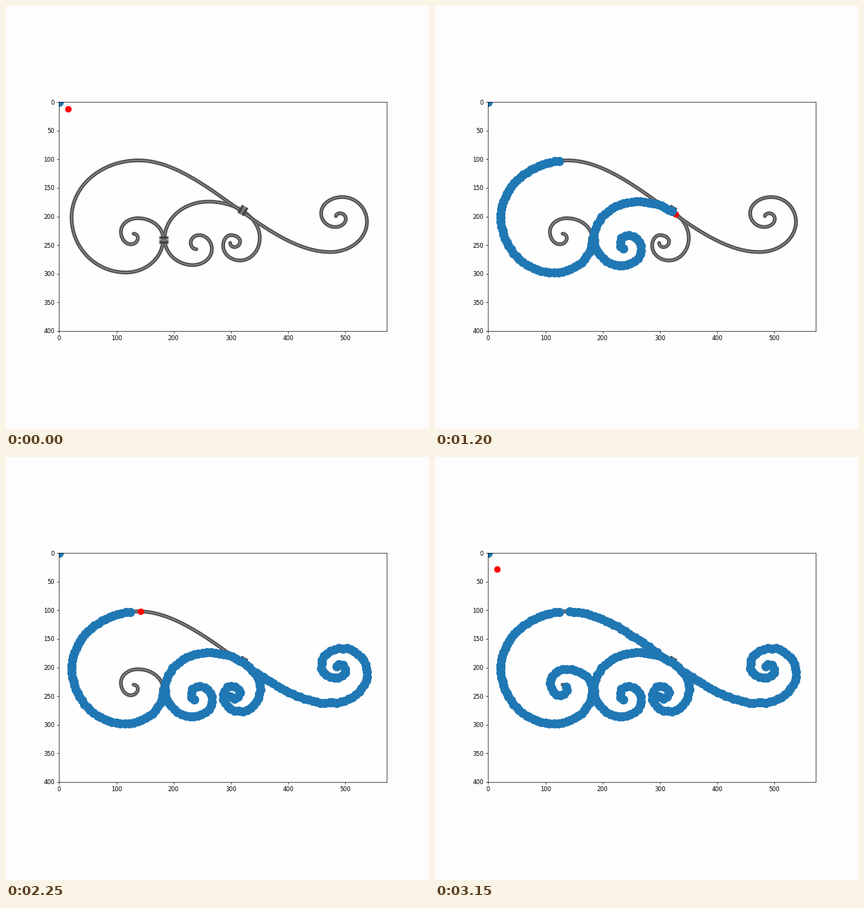
A matplotlib script that plays this animation: 600 px wide and 600 px high, repeating every 3200 ms.

```python
import numpy as np
import matplotlib.pyplot as plt
from matplotlib.animation import FuncAnimation

plt.rcParams["font.family"] = "DejaVu Sans"
FRAMES, INTERVAL = 64, 50
LEFT, RIGHT, TOP, BOTTOM = 75, 540, 135.8, 461.2  # axes box in pixels
SCALE = (RIGHT - LEFT) / 573  # pixels per tick unit
N = 30  # steps per quarter turn
GAP = 6  # distance between traced dots
rng = np.random.default_rng(4)


def scroll(*turns):
    """Quarter ellipses through turning points; the first one is level."""
    t = np.linspace(0, np.pi / 2, N, endpoint=False)
    parts = []
    for i, ((x0, y0), (x1, y1)) in enumerate(zip(turns, turns[1:])):
        if i % 2 == 0:
            parts.append(np.c_[x0 + (x1 - x0) * np.sin(t), y1 + (y0 - y1) * np.cos(t)])
        else:
            parts.append(np.c_[x1 + (x0 - x1) * np.cos(t), y0 + (y1 - y0) * np.sin(t)])
    return np.vstack(parts + [turns[-1]])


def part(curve, a, b=None):
    """Piece of a scroll from quarter a to quarter b."""
    return curve[int(a * N):None if b is None else int(b * N) + 1]


def slope(x0, x1):
    """Piece of the long bar, an S between the crest and the trough."""
    x = np.linspace(x0, x1, 60)
    u = (x - CREST[0]) / (TROUGH[0] - CREST[0])
    return np.c_[x, CREST[1] + (TROUGH[1] - CREST[1]) * u * u * (3 - 2 * u)]


def dots(curve):
    """Evenly spaced, slightly shaky dots along a curve."""
    s = np.r_[0, np.cumsum(np.hypot(*np.diff(curve, axis=0).T))]
    at = np.arange(GAP / 2, s[-1], GAP)
    xy = np.c_[np.interp(at, s, curve[:, 0]), np.interp(at, s, curve[:, 1])]
    return xy + rng.uniform(-0.6, 0.6, xy.shape)


CREST, TROUGH = (188, 219), (460, 349)
loop = scroll(CREST, (93, 300), (170, 378), (223, 330), (187, 301), (163, 320),
              (177, 338), (187, 329), (181, 323))
curl = scroll(TROUGH, (512, 306), (477, 271), (447, 294), (467, 313.5), (482, 302),
              (474, 294), (468, 298))
inner = scroll((270, 345), (262, 336), (274, 325), (292, 345), (265, 367.5), (225, 330),
               (287, 277.5), (360, 329), (332, 361), (308, 340), (319, 325), (332, 334),
               (324, 342), (318, 336))

# Curves traced up to each key step
plan = {
    11: [part(loop, 0.08, 2.1)],
    24: [part(loop, 2.1, 3), part(inner, 0, 6.5)],
    34: [part(inner, 6.5), slope(352, 460)],
    45: [curl],
    58: [slope(CREST[0], 315), part(loop, 3)],
}
trace, keys, counts = np.empty((0, 2)), [0], [0]
for step, curves in plan.items():
    trace = np.vstack([trace] + [dots(c) for c in curves])
    keys.append(step)
    counts.append(len(trace))

fig = plt.figure(figsize=(10, 10), dpi=60, facecolor="#fefdfe")
ax = fig.add_axes([LEFT / 600, 1 - BOTTOM / 600, (RIGHT - LEFT) / 600, (BOTTOM - TOP) / 600],
                  facecolor="#fefefe")


def bar(curve):
    for width, color in ((6.6, "#787678"), (5, "#434143"), (2, "#8d8b8d")):
        ax.plot(*curve.T, color=color, lw=width, zorder=1, solid_capstyle="round")


def collar(x, y, angle):
    """Three bands wrapped round a bar."""
    a = np.radians(angle)
    along, across = np.array([np.cos(a), np.sin(a)]), np.array([-np.sin(a), np.cos(a)])
    for shift, color in ((-3.5, "#434143"), (0, "#787678"), (3.5, "#434143")):
        mid = np.array([x, y]) + shift * across
        ax.plot(*np.c_[mid - 6.5 * along, mid + 6.5 * along], color=color, lw=4,
                solid_capstyle="butt", zorder=2)


bar(inner)
bar(np.vstack([curl[::-1], slope(TROUGH[0], CREST[0]), loop]))
collar(223, 331.5, 0)
collar(336, 290, 120)

pen = ax.scatter([], [], s=100, color="red", zorder=2.2)
ink = ax.scatter([], [], s=215, color="#1f77b4", zorder=2.3)
origin = (LEFT + SCALE / 2, TOP + SCALE / 2)

ax.set(xlim=(LEFT, RIGHT), ylim=(BOTTOM, TOP))
xs, ys = np.arange(0, 501, 100), np.arange(0, 401, 50)
ax.set_xticks(origin[0] + SCALE * xs, labels=xs)
ax.set_yticks(origin[1] + SCALE * ys, labels=ys)


def draw(i):
    n = round(np.interp(i, keys, counts))
    ink.set_offsets(np.vstack([origin, trace[:n]]))
    if i == 0:
        pen.set_offsets([(88, 146)])
    elif n < len(trace):
        pen.set_offsets(trace[n:n + 1])
    else:
        pen.set_offsets([(88, 158.5)])
    return pen, ink


anim = FuncAnimation(fig, draw, frames=FRAMES, interval=INTERVAL, repeat=True, repeat_delay=0)
plt.show()
```
